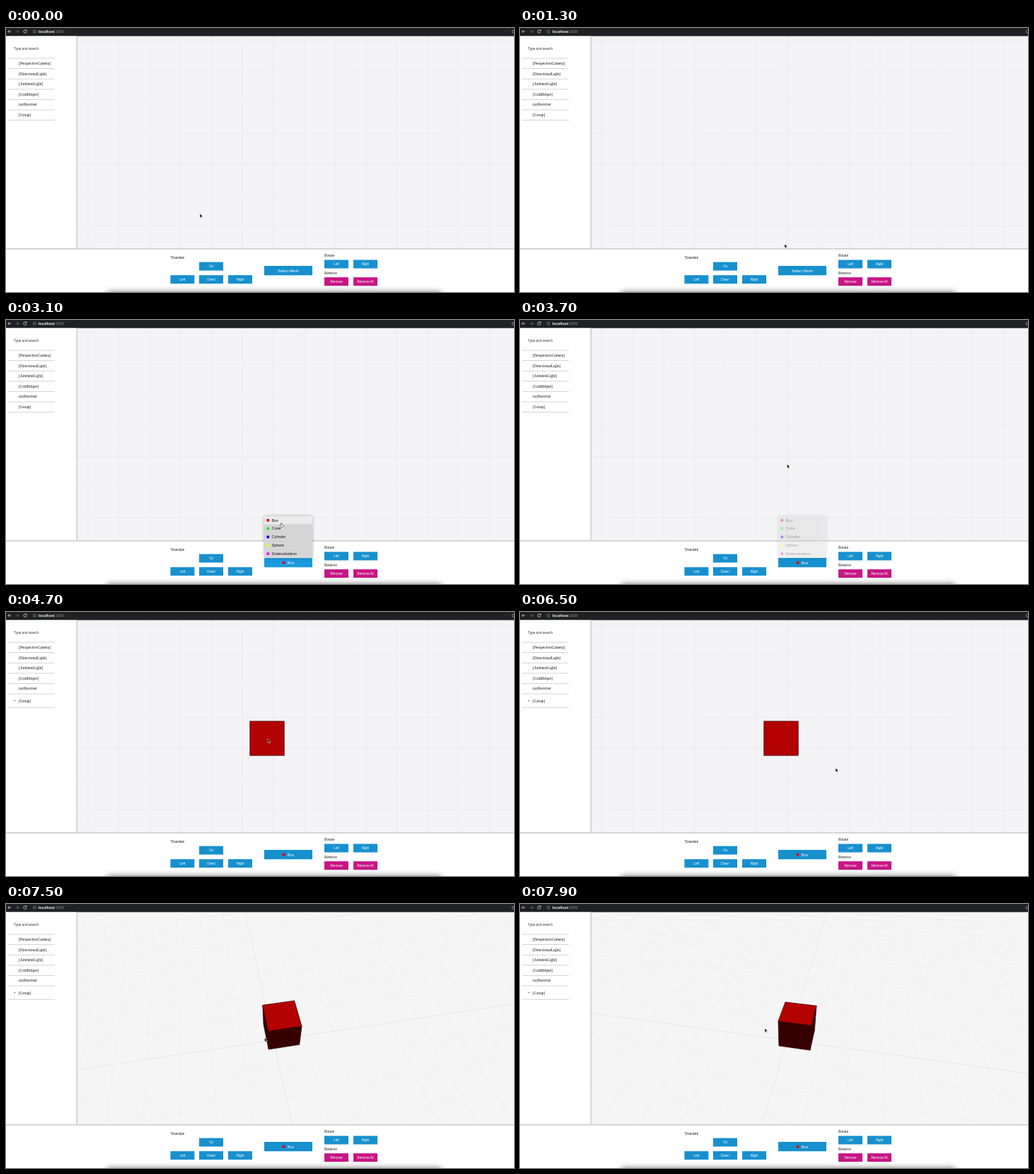
An HTML page with a canvas that plays this animation: 718x374 px, repeating every 8 s.

```html
<!DOCTYPE html>
<html lang="en">
<head>
<meta charset="utf-8">
<title>Mesh editor</title>
<style>
html, body { margin: 0; width: 100%; height: 100%; overflow: hidden; background: #fff; }
#stage { position: relative; width: 718px; height: 374px; overflow: hidden; }
#view, #ui { position: absolute; left: 0; top: 0; width: 718px; height: 374px; }
#dock { position: absolute; left: 144px; top: 375px; width: 470px; height: 10px; box-shadow: 0 0 9px 1px rgba(0, 0, 0, .55); }
text { font-family: "Liberation Sans", Arial, sans-serif; }
.serif { font: 5.4px "Liberation Serif", "Times New Roman", serif; }
</style>
</head>
<body>
<div id="stage">
  <canvas id="view"></canvas>
  <svg id="ui" viewBox="0 0 718 374"></svg>
  <div id="dock"></div>
</div>
<script>
const LOOP = 8000, STEP = 100;
const BLUE = '#1790cd', BLUE_HOT = '#1a9bde', PINK = '#c71585', PINK_HOT = '#d62c98';
const ui = document.getElementById('ui');

function add(tag, attrs, parent = ui, content) {
  const el = document.createElementNS('http://www.w3.org/2000/svg', tag);
  for (const k in attrs) el.setAttribute(k, attrs[k]);
  if (content) el.textContent = content;
  parent.append(el);
  return el;
}
const rect = (x, y, width, height, fill, parent) => add('rect', { x, y, width, height, fill }, parent);
const path = (d, attrs, parent) => add('path', { d, fill: 'none', ...attrs }, parent);
const sans = (s, x, y, size, attrs, parent) => add('text', { x, y, 'font-size': size, ...attrs }, parent, s);
const serif = (s, x, y, parent) => add('text', { x, y, class: 'serif', fill: '#111' }, parent, s);
const show = (el, on) => el.setAttribute('visibility', on ? 'visible' : 'hidden');

// Panels
rect(0, 0, 718, 11.5, '#202124');
rect(0, 11.5, 99.5, 301, '#fff');
rect(99.5, 11.5, 1.6, 301, '#cdcdcd');
rect(0, 312, 718, 62, '#fff');
rect(0, 312, 718, 1.6, '#cdcdcd');

// Browser bar
const icon = { stroke: '#d5d6d8', 'stroke-width': .8 };
path('M7.2 5H3M4.8 3 2.8 5l2 2', icon);
path('M13.8 5H18M16.2 3l2 2-2 2', { ...icon, stroke: '#6b6d70' });
path('M28.8 3.6A2.2 2.2 0 1 0 29.2 5.4M29.2 2.4v1.7h-1.7', icon);
add('circle', { cx: 40.3, cy: 5, r: 2, fill: 'none', stroke: '#a5a7aa', 'stroke-width': .5 });
path('M40.3 4.6v1.5M40.3 3.6v.5', { stroke: '#a5a7aa', 'stroke-width': .5 });
const url = sans('', 45.8, 6.8, 5.2, {});
add('tspan', { fill: '#f1f1f2', 'font-weight': 'bold' }, url, 'localhost');
add('tspan', { fill: '#8b8d91' }, url, ':3000');
add('circle', { cx: 717, cy: 5.2, r: 1.8, fill: 'none', stroke: '#b5b6b8', 'stroke-width': .7 });

// Scene list
sans('Type and search', 11, 31, 4.75, { fill: '#333' });
const rule = y => rect(3, y - .4, 66, .8, '#c8c8c8');
['[PerspectiveCamera]', '[DirectionalLight]', '[AmbientLight]', '[GridHelper]', 'rayReceiver'].forEach((s, i) => {
  rule(43 + i * 14.6);
  serif(s, 18, 52 + i * 14.6);
});
rule(116);
const group = serif('[Group]', 18, 125);
const plus = serif('+', 10.7, 127.6);
const lastRule = rule(130.5);

// Controls
function button(s, x, y, fill = BLUE) {
  const box = rect(x, y, 34, 12, fill);
  sans(s, x + 17, y + 7.6, 4.55, { fill: '#fff', 'text-anchor': 'middle' });
  return box;
}
serif('Translate', 232.4, 327);
serif('Rotate', 450, 323.8);
serif('Remove', 450, 348.6);
button('Up', 273, 331.6);
button('Left', 232.4, 350.2);
button('Down', 273, 350.2);
button('Right', 314, 350.2);
button('Left', 450, 328.5);
button('Right', 491, 328.5);
const removeBtn = button('Remove', 450, 353.2, PINK);
button('Remove All', 491, 353.2, PINK);
const meshBtn = rect(365, 337, 68, 13.3, BLUE);
const meshLabel = sans('Select Mesh', 399, 345.6, 5.45, { fill: '#fff', 'text-anchor': 'middle' });
const picked = add('g', {});
rect(390.7, 341.9, 3.6, 3.6, '#e00000', picked);
sans('Box', 397.8, 345.6, 5.45, { fill: '#fff' }, picked);

// Mesh menu
const ROW = 11.86, MENU_Y = 277.8;
const menu = add('g', { style: 'filter: drop-shadow(0 0 2px rgba(0,0,0,.3))' });
const rows = [['Box', '#e60000'], ['Cone', '#1ee61e'], ['Cylinder', '#0000e6'], ['Sphere', '#f5f50a'], ['Dodecahedron', '#f000e6']].map(([s, color], i) => {
  const y = MENU_Y + i * ROW;
  const bg = rect(365, y, 68, ROW, '#d5d5d5', menu);
  rect(365, y + ROW - .5, 68, .5, '#e4e4e4', menu);
  rect(368.5, y + 4.1, 3.6, 3.6, color, menu);
  sans(s, 375.6, y + 7.8, 5.4, { fill: '#111' }, menu);
  return bg;
});

// Pointers
const pen = { 'stroke-width': .5, 'stroke-linejoin': 'round' };
const arrow = path('M0 0V5.6L1.3 4.5 2.2 6.5 3.1 6.1 2.3 4.1H4Z', { ...pen, fill: '#000', stroke: '#fff' });
const hand = path('M-.6.4Q0-.4.6.4V2.2L2.8 2.7Q3.4 2.9 3.2 3.8L2.7 5.6H-.4L-1.9 3.4Q-1.7 2.6-.6 3.2Z', { ...pen, fill: '#fff', stroke: '#111' });

// Pointer track: time, x, y
const TRACK = [
  [0, 274, 263], [100, 282, 268], [200, 345, 310], [300, 462, 357], [400, 455, 354], [500, 432, 326],
  [600, 382, 314], [700, 382, 314], [1000, 370, 299], [1300, 374, 306], [1600, 386, 321], [1700, 388, 338],
  [1800, 389, 341], [2500, 389, 341], [2900, 389, 291], [3100, 389, 287.5], [3200, 389, 281], [3400, 388, 247],
  [3800, 374, 190], [4100, 370, 179.5], [5000, 370, 179.5], [5600, 329, 198], [5900, 329, 198], [6100, 327, 200],
  [6200, 327, 200], [6300, 420, 275], [6400, 505, 328], [6500, 446, 221], [6600, 436, 221], [6800, 423, 217],
  [7100, 385, 203], [7900, 346, 176]
];
function pointerAt(t) {
  const i = TRACK.findIndex(k => k[0] >= t);
  if (i < 1) return TRACK[0].slice(1);
  const [t0, x0, y0] = TRACK[i - 1], [t1, x1, y1] = TRACK[i], k = (t - t0) / (t1 - t0);
  return [x0 + (x1 - x0) * k, y0 + (y1 - y0) * k];
}

// 3D view: orbit camera around the grid origin
const FOCAL = 437, DIST = 10, CX = 378, CY = 193, GRID = 20;
const canvas = document.getElementById('view'), g = canvas.getContext('2d');
const dpr = window.devicePixelRatio || 1;
canvas.width = 718 * dpr;
canvas.height = 374 * dpr;

function camera(yaw, tilt) {
  const c = Math.cos(yaw), s = Math.sin(yaw), ct = Math.cos(tilt), st = Math.sin(tilt);
  return ([x, y, z]) => {
    const w = x * s + z * c;
    return [x * c - z * s, y * st - w * ct, DIST - y * ct - w * st];
  };
}
const toScreen = ([r, u, d]) => [CX + FOCAL * r / d, CY - FOCAL * u / d];

function gridLine(cam, a, b) {
  let p = cam(a), q = cam(b);
  const near = 1;
  if (p[2] < near && q[2] < near) return;
  const clip = (from, to) => from.map((v, i) => v + (to[i] - v) * (near - from[2]) / (to[2] - from[2]));
  if (p[2] < near) p = clip(p, q);
  if (q[2] < near) q = clip(q, p);
  g.beginPath();
  g.moveTo(...toScreen(p));
  g.lineTo(...toScreen(q));
  g.stroke();
}

function quad(pts, fill) {
  const area = pts.reduce((sum, [x, y], i) => {
    const [nx, ny] = pts[(i + 1) % 4];
    return sum + x * ny - nx * y;
  }, 0);
  if (area <= 0) return;
  g.beginPath();
  pts.forEach(p => g.lineTo(...p));
  g.closePath();
  g.fillStyle = fill;
  g.fill();
  g.stroke();
}

function drawView(yaw, tilt, hasBox) {
  const cam = camera(yaw, tilt), turned = yaw > 0;
  g.setTransform(dpr, 0, 0, dpr, 0, 0);
  g.fillStyle = turned ? '#f5f5f6' : '#f4f3f5';
  g.fillRect(0, 0, 718, 374);
  g.lineWidth = .8;
  for (let i = -GRID; i <= GRID; i++) {
    g.strokeStyle = i ? (turned ? '#eeeef0' : '#eaeaed') : '#e4e4e7';
    gridLine(cam, [i, 0, -GRID], [i, 0, GRID]);
    gridLine(cam, [-GRID, 0, i], [GRID, 0, i]);
  }
  if (!hasBox) return;
  const bx = -.185, bz = -.288;
  const ring = y => [[-.5, -.5], [.5, -.5], [.5, .5], [-.5, .5]].map(([x, z]) => toScreen(cam([bx + x, y, bz + z])));
  const top = ring(1), low = ring(0);
  g.strokeStyle = '#3c0000';
  g.lineWidth = .7;
  g.lineJoin = 'round';
  ['#300000', '#370000', '#2a0000', '#300000'].forEach((fill, i) => {
    const j = (i + 1) % 4;
    quad([top[j], top[i], low[i], low[j]], fill);
  });
  quad(top, '#b30000');
}

const clamp = v => Math.max(0, Math.min(1, v));
const RAD = Math.PI / 180;
let last = -1;

function render(t) {
  const [x, y] = pointerAt(t);
  const hasBox = t >= 4700, drag = t >= 6600;
  drawView(drag ? (436 - x) * 1.13 * RAD : 0, drag ? (221 - y) * 1.07 * RAD : 0, hasBox);

  group.setAttribute('y', hasBox ? 127.6 : 125);
  lastRule.setAttribute('y', hasBox ? 134.8 : 130.1);
  show(plus, hasBox);

  const overMesh = t >= 1700 && t <= 3200;
  const overRemove = x > 450 && x < 484 && y > 353 && y < 365;
  meshBtn.setAttribute('fill', overMesh ? BLUE_HOT : BLUE);
  removeBtn.setAttribute('fill', overRemove ? PINK_HOT : PINK);
  show(meshLabel, t < 2900);
  show(picked, t >= 2900);

  menu.setAttribute('opacity', t <= 3200 ? clamp((t - 1600) / 800) : clamp(1 - (t - 3200) / 800));
  const hot = Math.floor((y - MENU_Y) / ROW);
  rows.forEach((bg, i) => bg.setAttribute('fill', overMesh && i === hot ? '#ebebeb' : '#d5d5d5'));

  const onHand = overMesh || overRemove;
  show(hand, onHand);
  show(arrow, !onHand);
  (onHand ? hand : arrow).setAttribute('transform', `translate(${x} ${y})`);
}

function tick() {
  const t = Math.floor(performance.now() % LOOP / STEP) * STEP;
  if (t !== last) render(last = t);
  requestAnimationFrame(tick);
}
tick();
</script>
</body>
</html>
```
